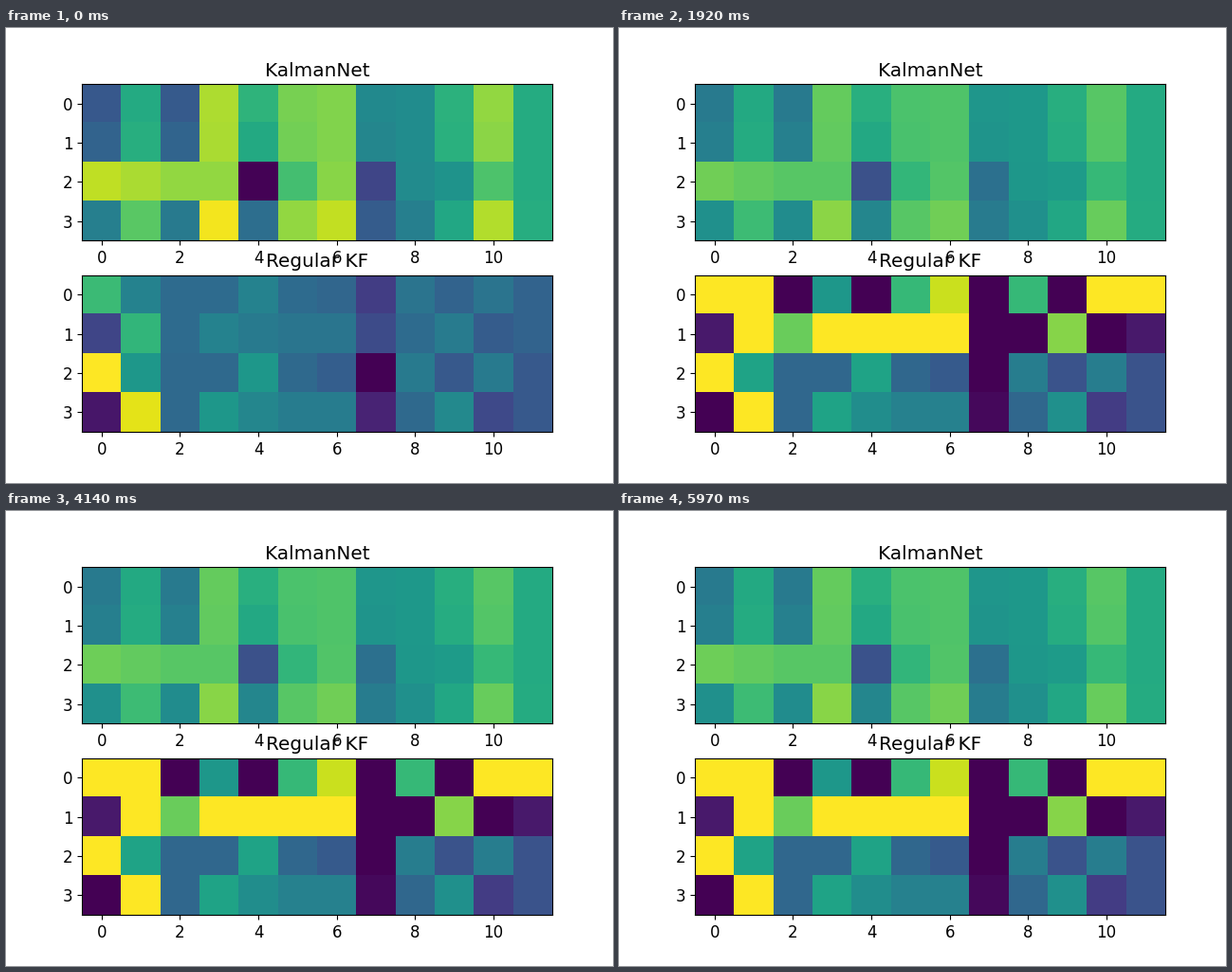
Animation, 640 px wide and 480 px high, one loop 6000 ms. Source, as a matplotlib script:

```python
import numpy as np
import matplotlib.pyplot as plt
from matplotlib.animation import FuncAnimation

STEP = 30      # ms per frame
FRAMES = 200
NET_MID = 0.6  # colour level the learned gain spreads around
KF_ZERO = 0.36 # colour level of a zero filter gain

plt.rcParams.update({"font.family": "DejaVu Sans", "font.size": 12})

# One entry per sensor; every gain row is a mix of these profiles.
level = np.array([-.07, .06, -.08, .16, -.1, .1, .13, -.13, -.07, 0, .12, .01])
tilt = np.array([.25, .1, .22, -.02, -.25, -.04, 0, -.1, 0, -.05, -.05, 0])
burst = np.array([
    [.9, .4, -.7, -.2, .1, -.4, .2, -.52, .25, -.25, .15, .33],
    [-.5, .8, .2, .1, -.1, -.15, .65, -.45, -.3, .85, -.75, 0]])
position = np.array([
    [1, 1, -1, .17, -1, .31, .56, -1, .31, -1, 1, 1],
    [-.29, 1, .41, 1, 1, 1, 1, -1, -1, .46, -1, -.29]])
velocity = np.array([
    [.64, .17, -.02, -.02, .17, -.02, -.06, -.36, .05, -.08, .05, -.08],
    [-.3, .6, -.02, .17, .1, .06, .06, -.26, -.02, .11, -.14, -.08]])

# State rows: x, y, x speed, y speed.
net_rest = np.outer([.95, .95, 1, 1.4], level) + np.outer([-.5, -.4, 1, 0], tilt)
net_burst = np.vstack([burst, 0.7 * burst])
kf_start = np.vstack([0.5 * velocity, velocity])
kf_rest = np.vstack([position, 1.3 * velocity])


def bump(t, centre, half_width):
    u = min(abs(t - centre) / half_width, 1)
    return np.cos(u * np.pi / 2) ** 2


def net_gain(t):
    contrast = 1 + 0.7 * np.exp(-(t / 900) ** 2)
    surge = 0.8 * bump(t, 3090, 700) + bump(t, 4800, 600)
    return NET_MID + contrast * net_rest + surge * net_burst


def kf_gain(t):
    return KF_ZERO + kf_rest + (kf_start - kf_rest) * np.exp(-t / 130)


fig, axes = plt.subplots(2, 1, figsize=(6.4, 4.8), dpi=100)
panels = []
for ax, title, gain in zip(axes, ("KalmanNet", "Regular KF"),
                           (net_gain, kf_gain)):
    image = ax.imshow(gain(0), cmap="viridis", vmin=0, vmax=1)
    ax.set_title(title)
    ax.set_xticks(range(0, 12, 2))
    ax.set_yticks(range(4))
    panels.append((image, gain))


def update(i):
    for image, gain in panels:
        image.set_data(gain(i * STEP))
    return [image for image, _ in panels]


anim = FuncAnimation(fig, update, frames=FRAMES, interval=STEP,
                     repeat=True, repeat_delay=0)
plt.show()
```
